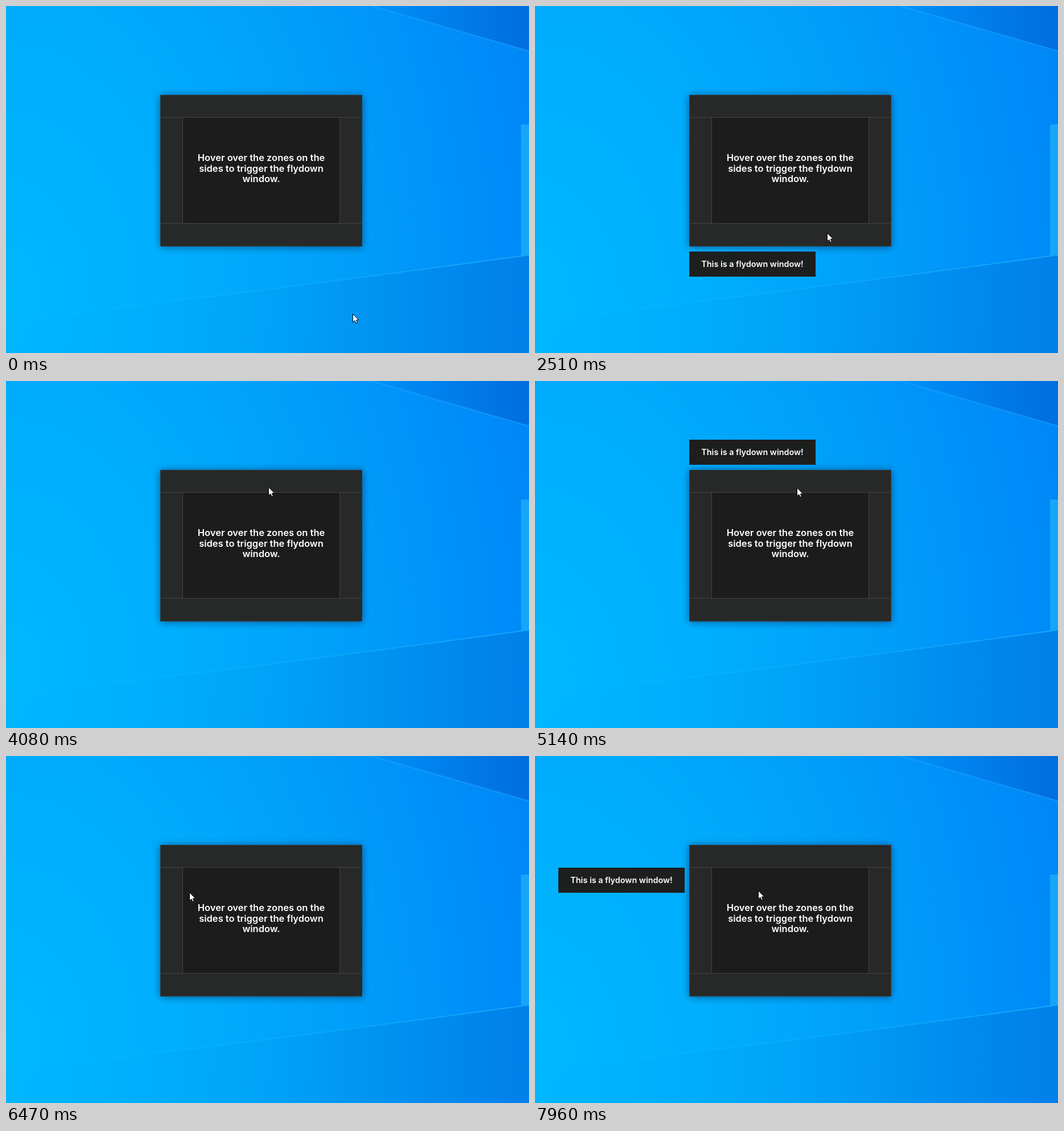
These frames come from a looping animation (919 by 609 pixels, 8 s). An HTML page with a canvas:

```html
<!DOCTYPE html>
<html lang="en">
<head>
<meta charset="utf-8">
<title>Flydown window</title>
<style>
  html, body { margin: 0; width: 100%; height: 100%; overflow: hidden; background: #00a4fb; }
  canvas { display: block; }
</style>
</head>
<body>
<canvas id="stage" width="919" height="609"></canvas>
<script>
const W = 919, H = 609, LOOP = 8000;
const ctx = document.getElementById('stage').getContext('2d');
const FONT = 'Inter, "Open Sans", sans-serif';

// Pointer moves: start, last step, step count, easing bias, path
const moves = [
  { from: 760, to: 1420, steps: 23, bias: 1.6, path: [[609, 540], [584, 508], [550, 460], [514, 400]] },
  { from: 1850, to: 1850, steps: 1, bias: 1, path: [[514, 400], [514, 399]] },
  { from: 2510, to: 2780, steps: 10, bias: 1.1, path: [[514, 399], [485, 325]] },
  { from: 3510, to: 4080, steps: 20, bias: 1, path: [[485, 325], [474, 255], [461, 186]] },
  { from: 5140, to: 5600, steps: 14, bias: 1, path: [[461, 186], [428, 212], [390, 231]] },
  { from: 6320, to: 6760, steps: 12, bias: 0.37, path: [[390, 231], [316, 240], [299, 245]] },
  { from: 7750, to: 7960, steps: 8, bias: 1, path: [[299, 245], [392, 236]] }
];

const flydowns = [
  { from: 1620, to: 3110, x: 271, y: 431 },
  { from: 4280, to: 5960, x: 271, y: 103 },
  { from: 6990, to: LOOP, x: 41, y: 196 }
];

function along(path, p) {
  const lengths = path.slice(1).map((b, i) => Math.hypot(b[0] - path[i][0], b[1] - path[i][1]));
  let rest = p * lengths.reduce((sum, n) => sum + n, 0);
  let i = 0;
  while (i < lengths.length - 1 && rest > lengths[i]) rest -= lengths[i++];
  const k = Math.min(1, rest / lengths[i]);
  return path[i].map((v, axis) => Math.round(v + (path[i + 1][axis] - v) * k));
}

function pointerAt(t) {
  const move = moves.filter(m => t >= m.from).pop();
  if (!move) return moves[0].path[0];
  if (t >= move.to) return move.path[move.path.length - 1];
  const interval = (move.to - move.from) / (move.steps - 1);
  const step = Math.floor((t - move.from) / interval + 1e-6) + 1;
  const u = Math.pow(step / move.steps, move.bias);
  return along(move.path, u * u * (3 - 2 * u));
}

function trace(c, points) {
  c.beginPath();
  points.forEach(([x, y]) => c.lineTo(x, y));
}

function linear(c, x0, y0, x1, y1, stops) {
  const g = c.createLinearGradient(x0, y0, x1, y1);
  stops.forEach(([at, color]) => g.addColorStop(at, color));
  return g;
}

function drawWallpaper(c) {
  c.save();
  c.translate(0, 520);
  c.scale(900, 1300);
  const glow = c.createRadialGradient(0, 0, 0, 0, 0, 1.1);
  [[0, '#00b8ff'], [0.28, '#00affe'], [0.45, '#00a7fc'], [0.65, '#009cf9'],
   [0.82, '#0090fa'], [1, '#0085f6']].forEach(([at, color]) => glow.addColorStop(at, color));
  c.fillStyle = glow;
  c.fillRect(-1, -1, 3, 3);
  c.restore();

  // Shade above the upper ray
  trace(c, [[642, 0], [W, 79], [W, 0]]);
  c.fillStyle = linear(c, 660, 0, W, 0, [[0, 'rgba(0,70,185,.06)'], [1, 'rgba(0,70,185,.38)']]);
  c.fill();

  // Shade below the lower ray
  const ray = () => {
    c.beginPath();
    c.moveTo(0, 553);
    c.quadraticCurveTo(480, 497, W, 437);
  };
  ray();
  c.lineTo(W, H);
  c.lineTo(0, H);
  c.fillStyle = linear(c, 0, 0, W, 0, [[0, 'rgba(0,100,190,0)'], [0.5, 'rgba(0,100,190,.05)'], [1, 'rgba(0,100,190,.26)']]);
  c.fill();

  c.lineWidth = 2;
  ray();
  c.strokeStyle = linear(c, 0, 0, W, 0, [[0, 'rgba(40,195,255,.1)'], [0.6, 'rgba(40,195,255,.25)'], [1, 'rgba(40,195,255,.55)']]);
  c.stroke();
  trace(c, [[642, 0], [W, 79]]);
  c.strokeStyle = 'rgba(30,165,255,.6)';
  c.stroke();

  c.fillStyle = '#17a5fa';
  c.fillRect(905, 208, 230, 230);
}

function drawPanel(c) {
  c.save();
  c.shadowColor = 'rgba(0,15,40,.55)';
  c.shadowBlur = 13;
  c.shadowOffsetY = 1;
  c.fillStyle = '#272928';
  c.fillRect(271, 156, 355, 266);
  c.restore();

  c.fillStyle = '#1c1c1c';
  c.fillRect(311, 196, 275, 186);
  c.lineWidth = 1;
  c.strokeStyle = '#353837';
  c.strokeRect(271.5, 156.5, 354, 265);
  c.strokeStyle = '#434343';
  [[272, 195.5, 625, 195.5], [272, 381.5, 625, 381.5],
   [310.5, 196, 310.5, 381], [586.5, 196, 586.5, 381]].forEach(([x0, y0, x1, y1]) => {
    trace(c, [[x0, y0], [x1, y1]]);
    c.stroke();
  });

  c.fillStyle = '#fff';
  c.font = '600 16.5px ' + FONT;
  c.textAlign = 'center';
  ['Hover over the zones on the', 'sides to trigger the flydown', 'window.']
    .forEach((line, i) => c.fillText(line, 448.5, 272 + i * 18.5));
}

function drawFlydown({ x, y }) {
  ctx.fillStyle = '#1d1e1e';
  ctx.fillRect(x, y, 222, 44);
  ctx.fillStyle = '#fff';
  ctx.font = '600 14.4px ' + FONT;
  ctx.textAlign = 'center';
  ctx.fillText('This is a flydown window!', x + 111, y + 26.5);
}

function drawPointer([x, y]) {
  ctx.save();
  ctx.translate(x + 0.5, y + 0.5);
  trace(ctx, [[0, 0], [0, 14.5], [3.3, 11.5], [5.5, 16.3], [7.8, 15.3], [5.8, 10.6], [10.2, 10.4]]);
  ctx.closePath();
  ctx.fillStyle = '#fff';
  ctx.fill();
  ctx.lineWidth = 1;
  ctx.lineJoin = 'round';
  ctx.strokeStyle = '#000';
  ctx.stroke();
  ctx.restore();
}

const scene = document.createElement('canvas');
scene.width = W;
scene.height = H;
const sceneCtx = scene.getContext('2d');
drawWallpaper(sceneCtx);
drawPanel(sceneCtx);

const start = performance.now();
function render() {
  const t = (performance.now() - start) % LOOP;
  ctx.drawImage(scene, 0, 0);
  flydowns.filter(f => t >= f.from && t < f.to).forEach(drawFlydown);
  drawPointer(pointerAt(t));
  requestAnimationFrame(render);
}
render();
</script>
</body>
</html>
```
